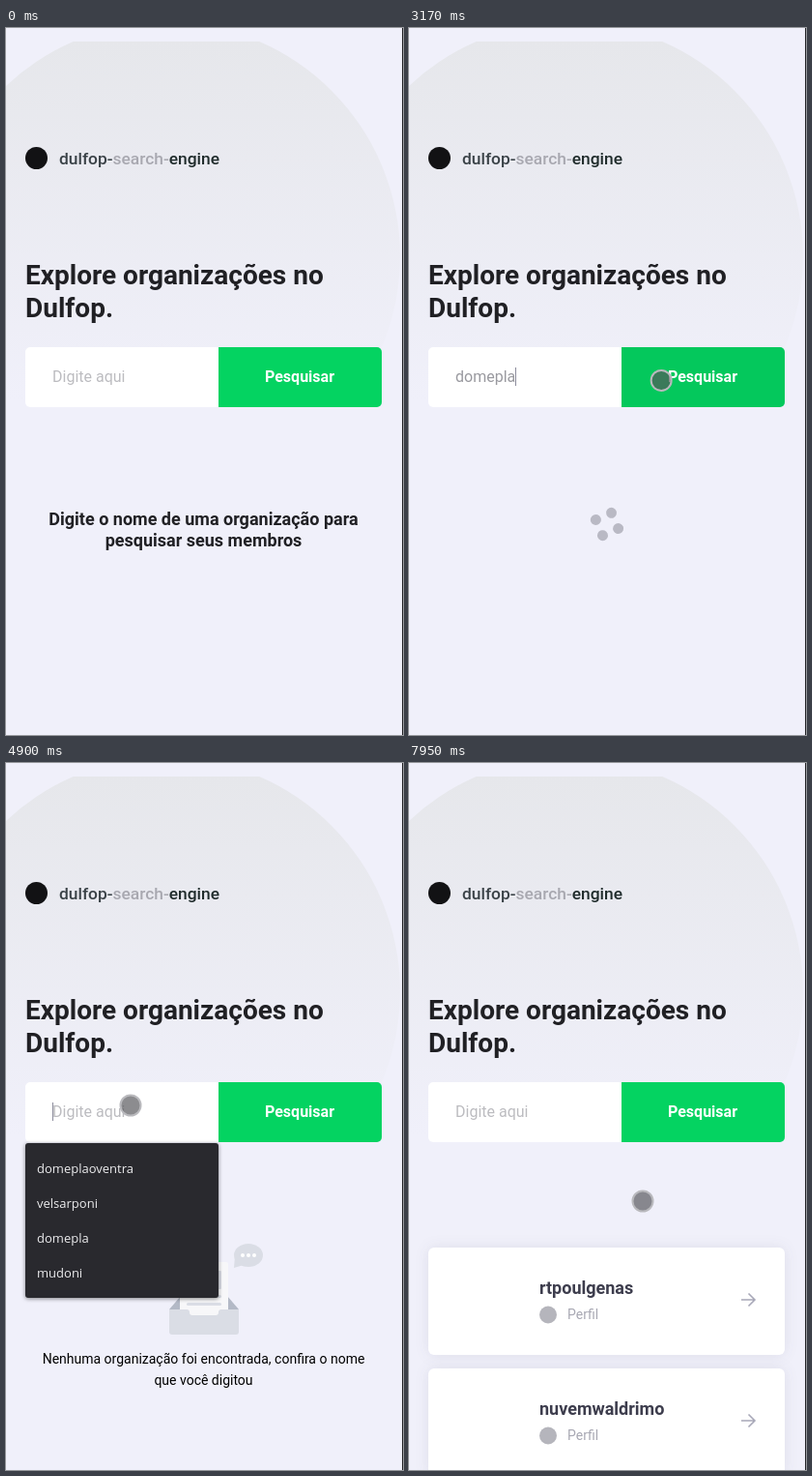
An HTML page for the animation above (7.99 s loop, 411x731 px).

```html
<!DOCTYPE html>
<html lang="pt-BR">
<head>
<meta charset="utf-8">
<title>Busca de organizações</title>
<style>
  html, body { margin: 0; width: 100%; height: 100%; overflow: hidden; background: #f0f0fa; }
  svg { display: block; font-family: Roboto, sans-serif; }
  text { white-space: pre; }
  .bold { font-weight: 700; fill: #202024; }
  .mid { text-anchor: middle; }
  #menu rect { filter: drop-shadow(0 1px 2px rgba(0, 0, 0, .45)); }
  #menu text { font: 13px "Open Sans", "Noto Sans", sans-serif; fill: #ececee; }
  .card rect { fill: #fff; filter: drop-shadow(0 0 7px rgba(40, 40, 70, .09)); }
</style>
</head>
<body>
<svg width="411" height="731" viewBox="0 0 411 731">
  <defs>
    <linearGradient id="fade" gradientUnits="userSpaceOnUse" x1="0" y1="14" x2="0" y2="385">
      <stop stop-color="#e6e7eb"/>
      <stop offset="1" stop-color="#f0f0fa"/>
    </linearGradient>
    <clipPath id="top"><rect y="14" width="411" height="371"/></clipPath>
  </defs>
  <rect width="411" height="731" fill="#f0f0fa"/>
  <circle cx="166" cy="236" r="242" fill="url(#fade)" clip-path="url(#top)"/>

  <circle cx="31.5" cy="134.5" r="11.5" fill="#121214"/>
  <text x="55" y="141" font-size="17.4" font-weight="500" fill="#3a4247">dulfop-<tspan fill="#a8a8b0">search-</tspan><tspan fill="#1f2b2b">engine</tspan></text>
  <g class="bold" font-size="28">
    <text x="20" y="265">Explore organizações no</text>
    <text x="20" y="299">Dulfop.</text>
  </g>

  <path d="M220 330H25a5 5 0 0 0-5 5v52a5 5 0 0 0 5 5h195z" fill="#fff"/>
  <path id="button" d="M220 330h164a5 5 0 0 1 5 5v52a5 5 0 0 1-5 5H220z"/>
  <text class="bold mid" x="304" y="366" font-size="16" style="fill:#fff">Pesquisar</text>
  <text id="field" x="48" y="366" font-size="16"></text>
  <rect id="caret" y="351" width="1" height="19" fill="#8c8c9c"/>

  <g id="hint" class="bold mid" font-size="18">
    <text x="204.5" y="514">Digite o nome de uma organização para</text>
    <text x="204.5" y="536">pesquisar seus membros</text>
  </g>

  <g id="loader" fill="#b9b9c4">
    <circle cx="205" cy="500.5" r="5.5"/>
    <circle cx="205" cy="525.5" r="5.5"/>
    <circle cx="192.5" cy="513" r="5.5"/>
    <circle cx="217.5" cy="513" r="5.5"/>
  </g>

  <g id="empty">
    <path d="M169 565l12-14h48l12 14v8h-72z" fill="#b3b9c6"/>
    <rect x="180" y="516" width="50" height="62" rx="2" fill="#f7f7f9"/>
    <g fill="#dadde5">
      <rect x="187" y="525" width="36" height="19" rx="1"/>
      <rect x="187" y="550" width="36" height="3" rx="1.5"/>
      <rect x="187" y="558" width="36" height="3" rx="1.5"/>
      <path d="M169 565h18q3 0 3 3t3 3h24q3 0 3-3t3-3h18v23q0 3-3 3h-66q-3 0-3-3z"/>
      <ellipse cx="251" cy="509" rx="15" ry="12"/>
      <path d="M237 510l-1 12 10-3z"/>
    </g>
    <g fill="#fff">
      <circle cx="245" cy="509" r="2"/><circle cx="251" cy="509" r="2"/><circle cx="257" cy="509" r="2"/>
    </g>
    <g class="mid" font-size="14">
      <text x="204.5" y="621">Nenhuma organização foi encontrada, confira o nome</text>
      <text x="204.5" y="643">que você digitou</text>
    </g>
  </g>

  <g id="cards"></g>
  <g id="menu"></g>
  <circle id="pointer" r="10.5" fill="rgba(85,85,90,.68)" stroke="#b9b9bd" stroke-width="2"/>
  <rect x="410" width="1" height="731" fill="#26262a"/>
</svg>
<script>
const LOOP = 7990;
const $ = id => document.getElementById(id);
const show = (id, on) => { $(id).style.display = on ? '' : 'none'; };
const within = (t, a, b) => t >= a && t < b;
const clamp = v => Math.max(0, Math.min(1, v));

const history = ['domeplaoventra', 'velsarponi', 'domepla', 'mudoni'];
const members = ['rtpoulgenas', 'nuvemwaldrimo'];

// each search: menu opens, keys land, enter starts loading, result arrives
const searches = [
  { word: history[2], open: 1100, enter: 2800, done: 3300,
    keys: [1600, 1770, 1970, 2000, 2180, 2410, 2570] },
  { word: history[0], open: 4870, enter: 7340, done: 7800,
    keys: [5220, 5350, 5530, 5590, 5770, 5990, 6190, 6350, 6530, 6700, 6800, 6900, 7000, 7090] }
];

// pointer way-points: time, x, y
const path = [
  [400, 366, 440], [550, 300, 376], [700, 228, 331], [1000, 144, 358],
  [2850, 144, 358], [3250, 290, 366], [3640, 290, 366], [3800, 257, 524],
  [3950, 245, 577], [4150, 214, 648], [4420, 217, 597], [4460, 217, 597],
  [4850, 129, 354], [7400, 129, 354], [7640, 250, 376], [7950, 242, 453]
];
const hovers = [[3120, 3650], [7600, 7690]];

$('cards').innerHTML = members.map((name, i) => `
  <g class="card" transform="translate(0 ${125 * i})">
    <rect x="20" y="501" width="369" height="111" rx="6"/>
    <text x="135" y="549" font-size="18" font-weight="700" fill="#3d3d4d">${name}</text>
    <circle cx="144" cy="570.5" r="9" fill="#b5b5bc"/>
    <text x="164" y="575" font-size="14" fill="#a8a8b3">Perfil</text>
    <path d="M344 555h14m-6.5-6.5l6.5 6.5l-6.5 6.5" fill="none" stroke="#a8a8b8" stroke-width="1.6"/>
  </g>`).join('');

function pointerAt(t) {
  const i = path.findIndex(p => p[0] > t);
  if (i < 0) return path[path.length - 1].slice(1);
  const [a, b] = [path[i - 1], path[i]];
  const k = (t - a[0]) / (b[0] - a[0]);
  return [a[1] + (b[1] - a[1]) * k, a[2] + (b[2] - a[2]) * k];
}

let menuKey;
function drawMenu(items) {
  const key = items.join();
  if (key === menuKey) return;
  menuKey = key;
  $('menu').innerHTML = items.length ? `
    <rect x="20" y="393" width="200" height="${16 + 36 * items.length}" rx="3" fill="#29292e"/>` +
    items.map((s, i) => `<text x="32" y="${424 + 36 * i}">${s}</text>`).join('') : '';
}

function draw(t) {
  const s = searches.find(s => within(t, s.open, s.done));
  const value = s ? s.word.slice(0, s.keys.filter(k => k <= t).length) : '';
  const field = $('field');
  field.textContent = value || 'Digite aqui';
  field.setAttribute('fill', value ? '#99999f' : '#bcbcc0');
  show('caret', s);
  $('caret').setAttribute('x', 48 + (value ? Math.round(field.getComputedTextLength()) : 0));

  let items = s && t < s.enter ? history.filter(h => h.startsWith(value)) : [];
  if (items.length === 1 && items[0] === value) items = [];
  drawMenu(items);

  const [first, second] = searches;
  show('hint', t < first.enter);
  show('empty', within(t, first.done, second.enter));
  show('cards', t >= second.done);
  show('loader', s && t >= s.enter);
  if (s) $('loader').setAttribute('transform', `rotate(${(t - s.enter) * .3} 205 513)`);

  const hover = Math.max(...hovers.map(([a, b]) => Math.min(clamp((t - a) / 200), clamp((b + 200 - t) / 200))));
  const mix = (a, b) => Math.round(a + (b - a) * hover);
  $('button').setAttribute('fill', `rgb(${mix(4, 3)},${mix(211, 169)},${mix(97, 78)})`);

  show('pointer', t >= path[0][0]);
  if (t >= path[0][0]) $('pointer').setAttribute('transform', `translate(${pointerAt(t)})`);
}

const start = performance.now();
function tick() {
  draw((performance.now() - start) % LOOP);
  requestAnimationFrame(tick);
}
tick();
</script>
</body>
</html>
```
